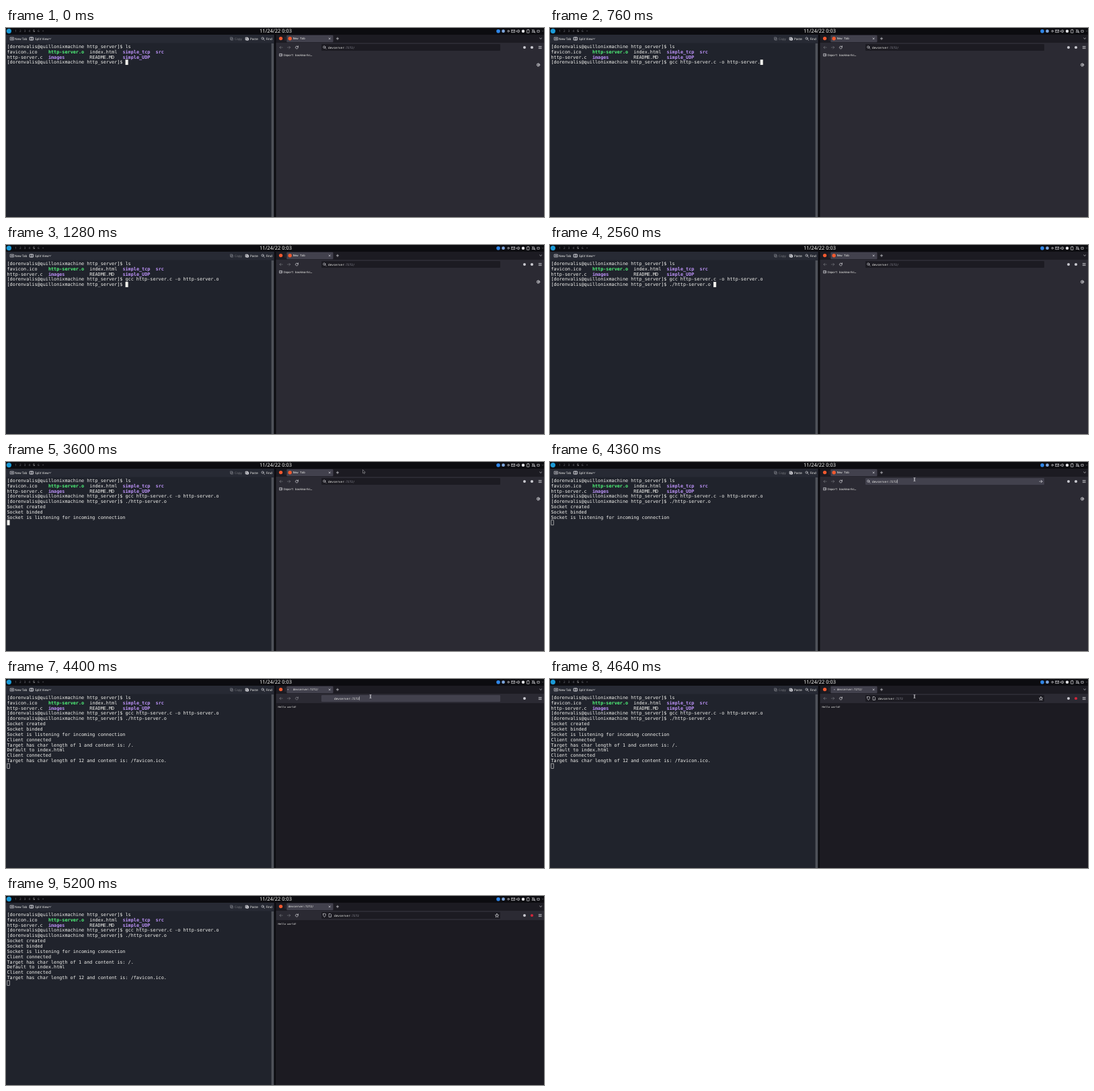
Recreate the animation shown at these times as an HTML page. Size 800 by 282 pixels, loop 6320 ms.

```html
<!DOCTYPE html>
<html lang="en">
<head>
<meta charset="utf-8">
<title>Terminal and browser</title>
<style>
  html, body { margin: 0; width: 100%; height: 100%; overflow: hidden; background: #0c0c10; }
  svg { display: block; width: 100vw; height: 100vh; }
  text { white-space: pre; text-rendering: geometricPrecision; fill: #f4f4f0; }
  .term text, .mono { font-family: "DejaVu Sans Mono", monospace; }
  .term text { font-size: 6.8px; }
  .ui { font: 4.6px "Noto Sans", sans-serif; }
  .spaces text { font: 4.6px "Noto Sans", sans-serif; fill: #73757c; text-anchor: middle; }
  .exec { fill: #50fa7b; font-weight: bold; }
  .dir { fill: #bd93f9; font-weight: bold; }
  .tab { font-size: 4.2px; }
  .url { font-size: 4.4px; }
  .line { fill: none; stroke: #e4e4e8; stroke-width: .65; stroke-linecap: round; stroke-linejoin: round; }
  .dim { opacity: .4; }
</style>
</head>
<body>
<svg viewBox="0 0 800 282" preserveAspectRatio="none">
  <!-- desktop panel -->
  <rect width="800" height="282" fill="#0c0c10"/>
  <circle cx="4.4" cy="4.6" r="3.6" fill="#1b9bd8"/>
  <g class="spaces" id="spaces"></g>
  <text x="401" y="7.4" text-anchor="middle" style="font:7.5px 'Noto Sans',sans-serif">11/24/22 0:03</text>
  <circle cx="732" cy="4.7" r="2.8" fill="#2f86e8"/>
  <circle cx="739.5" cy="4.7" r="2.4" fill="#7ea6dc"/>
  <circle cx="769" cy="4.7" r="2.2" fill="#e4e4e8"/>
  <g class="line">
    <circle cx="747" cy="4.7" r="1.3"/>
    <path d="M752 3h4.6v3.6h-4.6zl2.3 2 2.3-2"/>
    <path d="M759.5 4h1l1.5-1.5v4.6l-1.5-1.5h-1zM763.3 3.2q1.4 1.5 0 3"/>
    <path d="M775 2.8h3v4.4h-3zM776 2.3h1"/>
    <path d="M782.3 6q.8-.6.8-2 0-1.4 1.3-1.4t1.3 1.4q0 1.4.8 2zM782.3 2.4l4.2 4.8"/>
    <path d="M790.2 3.4h3v2.8h-3z"/>
    <path d="M797 4.2l1 1 1-1" class="dim"/>
  </g>

  <!-- terminal window -->
  <rect y="10" width="398.5" height="272" fill="#20232c"/>
  <rect y="10" width="398.5" height="12.5" fill="#272a34"/>
  <rect x="394.6" y="23" width="3.6" height="259" fill="#4e5159"/>
  <g class="line">
    <path d="M6.6 14h4.8v4h-4.8zM9 15v2M8 16h2"/>
    <path d="M35.6 14h4.8v4h-4.8zM38 14v4" stroke-width=".9"/>
    <path d="M64.2 15.5l1.3 1.2 1.3-1.2"/>
    <path d="M333.8 13.8h2.6v3.4h-2.6zM335 15h2.4v3.2h-2.4z" class="dim"/>
    <path d="M356.6 14.2h3v3.6h-3zM358 15.4h2.6v2.6h-2.6z" stroke-width=".9"/>
    <circle cx="381.6" cy="15.5" r="1.6"/><path d="M382.9 16.8l1.6 1.5"/>
  </g>
  <text class="ui" x="13" y="17.7">New Tab</text>
  <text class="ui" x="43" y="17.7">Split View</text>
  <text class="ui dim" x="340" y="17.7">Copy</text>
  <text class="ui" x="363" y="17.7">Paste</text>
  <text class="ui" x="386.5" y="17.7">Find</text>
  <g class="term" id="term"></g>
  <rect id="block"/>

  <!-- browser window -->
  <rect x="401.5" y="10" width="398.5" height="12.5" fill="#1c1b22"/>
  <rect x="401.5" y="22" width="398.5" height="260" fill="#2b2a33"/>
  <circle cx="408.6" cy="15.6" r="2.7" fill="#f0592f"/>
  <path d="M415.2 13v6" stroke="#4a4953" stroke-width=".5"/>
  <rect x="417.3" y="10.8" width="69.2" height="10.4" rx="1.2" fill="#42414d"/>
  <g class="line">
    <path d="M480.2 14.8l2 2m0-2l-2 2"/>
    <path d="M491.3 15.8h3.4M493 14.1v3.4"/>
    <path d="M793.6 15l1.5 1.4 1.5-1.4"/>
    <path d="M411.2 29h-4.2m1.7-1.8l-1.8 1.8 1.8 1.8M418.4 29h4.2m-1.7-1.8l1.8 1.8-1.8 1.8" class="dim"/>
    <path d="M434.2 28a2 2 0 1 0 .2 1.6M434.5 26.8v1.5h-1.5" id="reload"/>
    <path d="M792.2 27.4h4M792.2 29h4M792.2 30.6h4"/>
  </g>
  <circle cx="771" cy="29" r="2" fill="#c9c9d0"/>
  <circle id="addon" cx="782" cy="29" r="2.1"/>
  <rect id="field" x="469" y="23.9" width="266" height="10" rx="1.2"/>
  <rect id="selection" x="479" y="26" width="40" height="6" fill="#2a79c9"/>

  <g id="blank">
    <circle cx="422.2" cy="15.8" r="2.7" fill="#f0592f"/>
    <text class="mono tab" x="427" y="17.4">New Tab</text>
    <g class="line">
      <circle cx="473.3" cy="28.5" r="1.6"/><path d="M474.5 29.8l1.4 1.4"/>
      <path d="M407 38.4h3.4v3.6h-3.4zM408 40.2h2.8"/>
      <circle cx="791.5" cy="55" r="1.9"/><circle cx="791.5" cy="55" r=".6"/>
      <circle cx="791.5" cy="55" r="2.4" stroke-dasharray=".9 1" stroke-linecap="butt"/>
    </g>
    <text class="mono tab" x="412.4" y="41.6">Import bookmarks…</text>
  </g>
  <path id="go" class="line" d="M727.8 29h4.2m-1.8-1.8l1.8 1.8-1.8 1.8"/>

  <g id="page">
    <rect x="401.5" y="36" width="398.5" height="246" fill="#1c1b22"/>
    <text class="mono" x="404.6" y="43.3" font-size="3.8">Hello world!</text>
    <text class="mono tab" id="title" y="17.4">devserver:7272/</text>
    <circle id="spinner" cy="15.8" r=".7" fill="#b8b8c2"/>
  </g>
  <g id="siteIcons" class="line">
    <path d="M471.5 26.9l2-.7 2 .7q0 3.4-2 4.6-2-1.2-2-4.6z"/>
    <path d="M480.5 26.5h2l1 1v3.8h-3z"/>
    <path d="M730 26.4l.8 1.8 1.9.2-1.4 1.3.4 1.9-1.7-1-1.7 1 .4-1.9-1.4-1.3 1.9-.2z"/>
  </g>
  <text class="mono url" id="url" y="30.5"><tspan id="host">devserver</tspan><tspan id="port"></tspan></text>
  <rect id="caret" y="26.2" width=".5" height="5.4" fill="#fff"/>

  <path id="arrow" d="M0 0v5.2l1.2-1 .8 1.9 1-.5-.8-1.8h1.6z" fill="#15151a" stroke="#c8c8cc" stroke-width=".45"/>
  <path id="beam" class="line" d="M-1-2.6q1 0 1 .6v4q0 .6-1 .6M1-2.6q-1 0-1 .6v4q0 .6 1 .6" stroke-width=".5"/>
</svg>

<script>
const LOOP = 6320, STEP = 40;
const CHAR = 4.094, ROW = 7.86, LEFT = 1.5, TOP = 23.6;
const NS = "http://www.w3.org/2000/svg";
const PROMPT = "[dorenvalis@quillonixmachine http_server]$ ";
const $ = id => document.getElementById(id);

function addText(parent, x, y, content = "", cls = "") {
  const node = document.createElementNS(NS, "text");
  node.setAttribute("x", x);
  node.setAttribute("y", y);
  node.setAttribute("class", cls);
  node.textContent = content;
  return parent.appendChild(node);
}
const put = (row, col, content, cls) =>
  addText($("term"), LEFT + col * CHAR, TOP + 6.2 + row * ROW, content, cls);
const set = (node, attrs) => {
  for (const key in attrs) node.setAttribute(key, attrs[key]);
};
const show = (id, on) => { $(id).style.display = on ? "" : "none"; };
const pick = (table, t) => table.reduce((found, [time, value]) => time <= t ? value : found, "");

[..."123456+"].forEach((mark, i) => {
  const node = addText($("spaces"), 14.5 + i * 6.75, 6.4, mark);
  if (mark === "5") node.style.fill = "#f4f4f4";
});

// directory listing
put(0, 0, PROMPT + "ls");
[
  ["favicon.ico", ["http-server.o", "exec"], "index.html", ["simple_tcp", "dir"], ["src", "dir"]],
  ["http-server.c", ["images", "dir"], "README.MD", ["simple_UDP", "dir"]]
].forEach((files, r) => files.forEach((file, c) => {
  const [name, cls] = [].concat(file);
  put(r + 1, [0, 15, 30, 42, 54][c], name, cls);
}));

// typing, with tab completion
const compile = [[0, ""]];
const name = "http-server.";
[
  [40, "g"], [80, "c"], [120, "c"], [160, " "], [200, "h"], [240, "t"], [320, name.slice(2)],
  [360, "c"], [400, " "], [440, "-"], [480, "o"], [560, " "], [600, "h"], [640, "t"],
  [760, name.slice(2)], [840, "o"]
].forEach(([time, keys]) => compile.push([time, compile[compile.length - 1][1] + keys]));

const run = [[1280, ""], [1880, "."], [1920, "./"], [2240, "./h"], [2400, "./ht"], [2560, "./http-server.o "]];
const output = [
  [3000, "Socket created"],
  [3040, "Socket binded"],
  [3080, "Socket is listening for incoming connection"],
  [4400, "Client connected"],
  [4400, "Target has char length of 1 and content is: /."],
  [4400, "Default to index.html"],
  [4400, "Client connected"],
  [4400, "Target has char length of 12 and content is: /favicon.ico."]
];
const lines = Array.from({ length: 2 + output.length }, (_, i) => put(3 + i, 0));

function drawTerminal(t) {
  const shown = [PROMPT + pick(compile, t)];
  if (t >= 1280) shown.push(PROMPT + pick(run, t));
  output.forEach(([time, line]) => { if (t >= time) shown.push(line); });
  lines.forEach((node, i) => {
    const content = shown[i] || "";
    if (node.textContent !== content) node.textContent = content;
  });

  const fresh = (t >= 1200 && t < 1280) || t >= 2960;
  const row = 3 + shown.length - (fresh ? 0 : 1);
  const col = fresh ? 0 : shown[shown.length - 1].length;
  const hollow = t >= 4040, inset = hollow ? .35 : 0;
  set($("block"), {
    x: LEFT + col * CHAR + inset, y: TOP + row * ROW + inset,
    width: CHAR - 2 * inset, height: ROW - 2 * inset,
    fill: hollow ? "none" : "#f0f0ec", stroke: hollow ? "#e8e8e4" : "none", "stroke-width": .6
  });
}

function drawBrowser(t) {
  const loaded = t >= 4400, focused = t >= 4040 && t < 4480, settled = t >= 4480;
  const selected = t >= 4040 && t < 4160;
  show("blank", !loaded);
  show("page", loaded);
  show("siteIcons", settled);
  show("go", focused && !loaded);
  show("selection", selected);
  show("addon", !loaded || settled);
  show("spinner", t < 4720);
  set($("addon"), { fill: settled ? "#d3263a" : "#c9c9d0" });
  set($("reload"), { opacity: loaded && !settled ? .5 : 1 });
  set($("field"), { fill: focused ? "#42414d" : "#1c1b22" });

  const x = loaded ? 488 : 479;
  const port = t < 4320 ? ":7272/" : ":7272";
  set($("url"), { x });
  if ($("port").textContent !== port) $("port").textContent = port;
  $("port").style.fill = focused ? "#f4f4f0" : "#8f8e98";
  show("caret", focused && !selected);
  set($("caret"), { x: x + (9 + port.length) * 2.649 + .2 });

  const slide = Math.min(1, Math.max(0, (t - 4680) / 120));
  set($("title"), { x: 426.8 - 7 * slide });
  set($("spinner"), { cx: 421.3 - 2 * Math.cos((t - 4400) / 300 * Math.PI) });
}

// pointer: time, x, y
const path = [
  [3400, 422, 195], [3480, 458, 112], [3560, 514, 26], [3600, 530.5, 11.5],
  [3720, 535, 13], [3880, 540, 22], [4000, 542, 26],
  [4920, 542, 26], [5000, 570, 54], [5080, 650, 130], [5160, 755, 223]
];
function drawPointer(t) {
  const visible = t >= 3400 && t < 5200;
  let x = 0, y = 0;
  for (let i = 0; i < path.length - 1; i++) {
    const [t0, x0, y0] = path[i], [t1, x1, y1] = path[i + 1];
    if (t < t0) break;
    const k = Math.min(1, (t - t0) / (t1 - t0));
    x = x0 + (x1 - x0) * k;
    y = y0 + (y1 - y0) * k;
  }
  const overField = x > 469 && x < 735 && y > 23.9 && y < 33.9 && t > 3600;
  show("arrow", visible && !overField);
  show("beam", visible && overField);
  set($(overField ? "beam" : "arrow"), { transform: `translate(${x} ${y})` });
}

const start = performance.now();
function frame() {
  const t = Math.floor((performance.now() - start) % LOOP / STEP) * STEP;
  drawTerminal(t);
  drawBrowser(t);
  drawPointer(t);
  requestAnimationFrame(frame);
}
frame();
</script>
</body>
</html>
```
